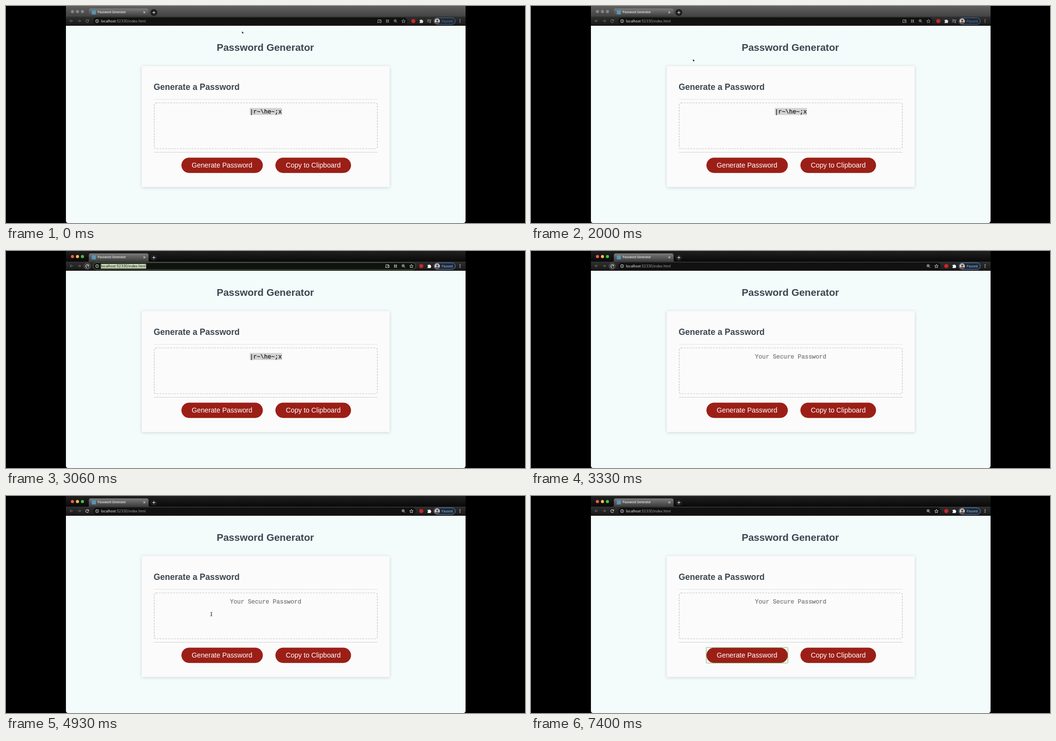
These frames come from a looping animation (1074x450 px, 8000 ms). An HTML page:

```html
<!DOCTYPE html>
<html lang="en">
<head>
<meta charset="utf-8">
<title>Password Generator</title>
<style>
html, body { margin: 0; width: 100%; height: 100%; overflow: hidden; background: #000; }
svg { display: block; width: 1074px; height: 450px; }
.sans { font-family: "Liberation Sans", Arial, sans-serif; }
.ui { font-family: Inter, Roboto, sans-serif; }
.mono { font: 12.3px "Liberation Mono", "Courier New", monospace; stroke-width: .25; }
.bold { font-weight: 700; fill: #3b4650; }
.line { fill: none; stroke-width: 1; }
.card { filter: drop-shadow(0 1px 3px rgba(40, 50, 60, .2)); }
</style>
</head>
<body>
<svg viewBox="0 0 1074 450">
  <defs>
    <linearGradient id="barIdle" x2="0" y2="1"><stop stop-color="#606060"/><stop offset="1" stop-color="#424242"/></linearGradient>
    <linearGradient id="barLive" x2="0" y2="1"><stop stop-color="#202020"/><stop offset="1" stop-color="#090909"/></linearGradient>
    <linearGradient id="tab" x2="0" y2="1"><stop stop-color="#7a7a7a"/><stop offset="1" stop-color="#3c3c3c"/></linearGradient>
    <linearGradient id="tools" x2="0" y2="1"><stop stop-color="#303030"/><stop offset="1" stop-color="#161616"/></linearGradient>
    <clipPath id="frame"><path d="M124 0H951V445.5a4.5 4.5 0 0 1-4.5 4.5H128.500a4.500 4.500 0 0 1-4.500-4.500z"/></clipPath>
    <clipPath id="face"><circle cx="892.300" cy="31.300" r="5.500"/></clipPath>
  </defs>
  <rect width="1074" height="450"/>
  <g clip-path="url(#frame)">
    <rect x="124" width="827" height="450" fill="#f4fbfb"/>
    <rect id="bar" x="124" width="827" height="22"/>
    <rect x="124" y="22" width="827" height="19" fill="url(#tools)"/>
  </g>

  <!-- tab strip -->
  <g id="lights"><circle cx="137.500" cy="11.500" r="3.200"/><circle cx="147.900" cy="11.500" r="3.200"/><circle cx="158.200" cy="11.500" r="3.200"/></g>
  <path d="M169 22q2.500 0 2.500-3V9q0-4 4-4H291q4 0 4 4v10q0 3 2.500 3z" fill="url(#tab)"/>
  <rect x="177.500" y="9" width="8.500" height="8.500" fill="#5b93b5"/>
  <text class="ui" x="189.700" y="15.400" font-size="6" font-weight="500" fill="#eee">Password Generator</text>
  <path d="M284.300 11.200l4 4m0-4l-4 4" class="line" stroke="#eee"/>
  <circle cx="306" cy="13.500" r="7" fill="#1c1c1c"/>
  <path d="M302.700 13.500h6.600M306 10.200v6.600" class="line" stroke="#eee"/>

  <!-- toolbar -->
  <rect id="field" x="180.500" y="24" height="14.800" rx="7.400" fill="#111"/>
  <path d="M138.500 31h-6m2.800-2.800l-2.800 2.800 2.800 2.800M148.500 31h6m-2.800-2.800l2.800 2.800-2.800 2.800" class="line" stroke="#777"/>
  <circle id="hover" cx="168" cy="31.300" r="6.600" fill="#3b3b3b" stroke="#777" stroke-width=".6"/>
  <g id="reload"><path d="M170.500 29.600a3 3 0 1 0 .400 2.600" class="line"/><path d="M171.400 27.700v3h-3z" stroke="none"/></g>
  <circle cx="188.500" cy="31.300" r="3.200" class="line" stroke="#ddd"/>
  <path d="M188.500 30.700v2.400M188.500 29.100v.800" class="line" stroke="#ddd"/>
  <rect id="mark" x="196.300" y="26.700" width="93.700" height="9.700" fill="#cbd8bb"/>
  <text class="ui" id="url" x="196.500" y="33.700" font-size="7.200"><tspan id="host">localhost</tspan><tspan id="path">:52330/index.html</tspan></text>

  <g id="icons" fill="none" stroke-width=".9">
    <g id="extra">
      <path d="M771 33.500h-1.500v-5h6v1.300M768.500 34.200h4"/><rect x="773.700" y="30" width="2.700" height="4.300"/>
      <path d="M786.200 29.500h6.600m-6.600 3.600h6.600M787.700 28v6.600m3.600-6.600v6.600"/>
    </g>
    <g id="pageIcons">
      <circle cx="805.300" cy="30.500" r="2.500"/><path d="M807.200 32.400l2.300 2.300M804 30.500h2.600m-1.300-1.300v2.600"/>
      <path d="M822.500 27.700l1.100 2.500 2.700.200-2.100 1.800.700 2.700-2.400-1.500-2.400 1.500.700-2.700-2.100-1.800 2.700-.200z"/>
    </g>
    <g id="addons">
      <circle cx="842.900" cy="31.300" r="4.300" fill="#c9252c" stroke="none"/>
      <path id="puzzle" stroke="none" d="M855.800 29h2a1.400 1.400 0 0 1 2.700 0h2v2a1.400 1.400 0 0 1 0 2.700v1.500h-6.700v-1.900a1.200 1.200 0 0 0 0-2.400z"/>
    </g>
    <path id="queue" stroke="#aaa" d="M871.500 28.500h6M871.500 30.800h6M871.500 33h3.500M878.500 34v-5h1.800"/><circle id="note" cx="877.500" cy="34" r="1.200" fill="#aaa" stroke="none"/>
  </g>
  <rect id="chip" x="885.500" y="24.500" width="44.300" height="13.800" rx="6.900" fill="#1d2a3a"/>
  <g clip-path="url(#face)"><rect x="886" y="25" width="13" height="13" fill="#d2cbc4"/><circle cx="892.500" cy="30" r="2.300" fill="#6b5147"/><ellipse cx="892.500" cy="36.500" rx="4.200" ry="3.700" fill="#6b5147"/></g>
  <text class="ui" id="paused" x="901.700" y="33.600" font-size="6.500">Paused</text>
  <g id="dots"><circle cx="939.600" cy="28.500" r=".900"/><circle cx="939.600" cy="31.300" r=".900"/><circle cx="939.600" cy="34.100" r=".900"/></g>

  <!-- page -->
  <text class="sans bold" x="435.900" y="93" font-size="20.600">Password Generator</text>
  <rect class="card" x="281" y="124.500" width="513" height="251" rx="2" fill="#fbfbfb"/>
  <text class="sans bold" x="305.500" y="174.400" font-size="17.500">Generate a Password</text>
  <path d="M306 193.500H769" class="line" stroke="#e2e2e2"/>
  <path d="M306 303.300H769" class="line" stroke="#d0d0d0" stroke-width="1.300"/>
  <rect x="306.700" y="201" width="461.800" height="95" rx="4" fill="none" stroke="#c2c2c2" stroke-width="1.200" stroke-dasharray="3.700 2.300"/>
  <g id="secret"><rect x="504.500" y="211.500" width="66.500" height="14.500" fill="#d3d3d3"/><text class="mono" x="537.700" y="223" text-anchor="middle" stroke="#111" fill="#111">|r~\he~;x</text></g>
  <text class="mono" id="hint" x="537.300" y="223" text-anchor="middle" stroke="#757575" fill="#757575">Your Secure Password</text>
  <g class="sans" font-size="14.200" text-anchor="middle" fill="#9b1f17">
    <rect x="363" y="314.500" width="168.500" height="31.700" rx="15.850"/>
    <rect x="557.500" y="314.500" width="156.500" height="31.700" rx="15.850"/>
    <text x="447" y="335" fill="#fff">Generate Password</text>
    <text x="635.800" y="335" fill="#fff">Copy to Clipboard</text>
  </g>
  <rect id="focus" x="362.600" y="314.200" width="169" height="32.200" rx="1" class="line" stroke="#78b765"/>

  <g id="cursor">
    <path id="arrow" d="M0 0v4.400l1-.9.700 1.500.8-.4-.7-1.400h1.400z" fill="#000" stroke="#fff" stroke-width=".5" paint-order="stroke"/>
    <path id="beam" d="M-1.800-3.800q1.800 0 1.800 1v5.600q0 1-1.800 1M1.800-3.800q-1.800 0-1.800 1M1.800 3.800q-1.800 0-1.800-1M-1 .9h2" class="line" stroke="#222" stroke-width=".8"/>
    <path id="hand" d="M-.7 4.500V.6q.7-1 1.400 0v2.200l3 .7q.8.200.6 1.300l-.6 2.900h-3.700l-2.500-3q.2-1 1.800-.2z" fill="#fff" stroke="#222" stroke-width=".6"/>
  </g>
</svg>
<script>
const LOOP = 8000, ACTIVE = 3060, RELOAD = 3330, CLICK = 6330, GONE = 7400;

const steps = [0, 60, 200, 330, 460, 600, 660, 800, 930, 1060, 1130, 1260, 1400, 1530, 1660,
  2000, 2060, 2260, 2400, 2530, 2600, 2730, 3060, 3330, 3600, 3730, 4000, 4200, 4330, 4460,
  4730, 4930, 5060, 5200, 5330, 5460, 5530, 6330, 6460, 6600, 7060, 7200, 7330, 7400];

// time, x, y
const route = [[0, 488.5, 52.5], [2000, 335.3, 110.3], [2260, 230, 70], [2530, 168, 31], [3600, 168, 31],
  [4000, 182.5, 31], [4930, 425, 245], [5530, 436, 327], [7060, 436, 327], [7330, 437, 251]];

const $ = id => document.getElementById(id);
const set = (id, attrs) => { for (const k in attrs) $(id).setAttribute(k, attrs[k]); };
const show = (id, on) => set(id, { visibility: on ? "visible" : "hidden" });
const shift = (id, x) => set(id, { transform: `translate(${x} 0)` });

function locate(t) {
  const i = route.findIndex(p => p[0] > t);
  if (i < 0) return route[route.length - 1].slice(1);
  const [a, b] = [route[i - 1], route[i]];
  const k = (t - a[0]) / (b[0] - a[0]);
  return [a[1] + (b[1] - a[1]) * k, a[2] + (b[2] - a[2]) * k];
}

function drawCursor(t) {
  const [x, y] = locate(t);
  const inside = (l, top, r, bottom) => x > l && x < r && y > top && y < bottom;
  const on = t < GONE;
  const beam = inside(306, 201, 769, 296), hand = inside(363, 314, 532, 346);
  set("cursor", { transform: `translate(${x} ${y})` });
  show("beam", on && beam);
  show("hand", on && hand);
  show("arrow", on && !beam && !hand);
}

function draw(t) {
  const live = t >= ACTIVE, fresh = t >= RELOAD, picked = live && !fresh;
  const tone = live ? "#ddd" : "#aaa";
  set("bar", { fill: `url(#${live ? "barLive" : "barIdle"})` });
  ["#f35b52", "#f4bd3e", "#45c146"].forEach((c, i) =>
    $("lights").children[i].setAttribute("fill", live ? c : "#858585"));
  set("field", { width: live ? 667.5 : 650, stroke: picked ? "#4f7d42" : "none" });
  show("hover", live && t < 3600);
  set("reload", { stroke: live ? "#fff" : "#888", fill: live ? "#fff" : "#888" });
  show("mark", picked);
  set("host", { fill: picked ? "#151515" : "#f2f2f2" });
  set("path", { fill: picked ? "#151515" : "#a3a3a3" });

  const move = live ? 16.5 : 0;
  set("icons", { stroke: tone });
  ["extra", "pageIcons", "addons"].forEach(id => shift(id, move));
  show("extra", !fresh);
  show("queue", !live);
  show("note", !live);
  set("puzzle", { fill: live ? "#fff" : "#ddd" });
  set("chip", { stroke: live ? "#6487b5" : "#56708f" });
  set("paused", { fill: live ? "#a4c5f1" : "#6b7b90" });
  set("dots", { fill: tone });

  show("secret", !fresh);
  show("hint", fresh);
  show("focus", t >= CLICK);
  drawCursor(t);
}

const start = performance.now();
function frame() {
  const t = (performance.now() - start) % LOOP;
  draw(steps.filter(s => s <= t).pop());
  requestAnimationFrame(frame);
}
frame();
</script>
</body>
</html>
```
